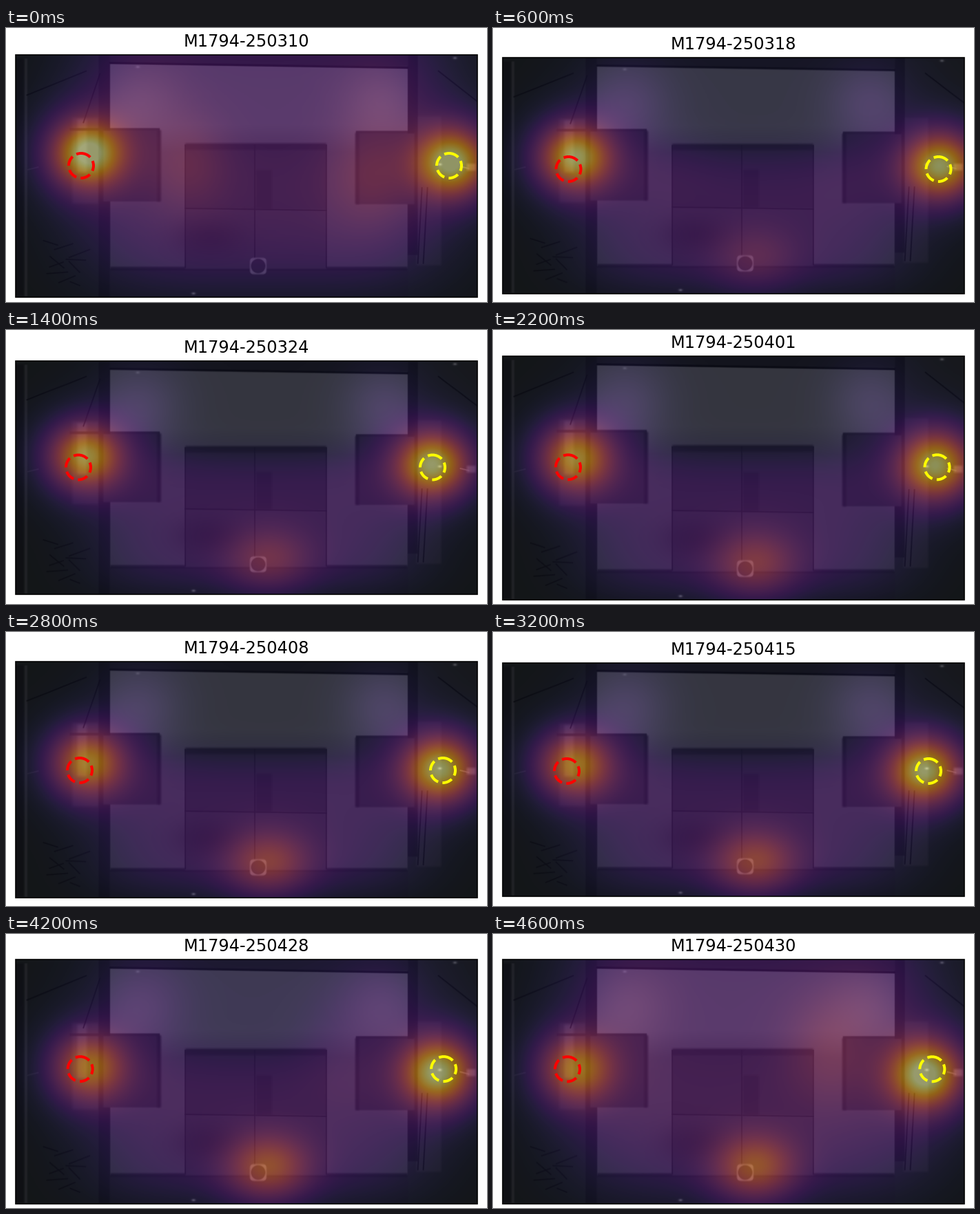
Write a matplotlib script that moves like this. It is 698x398 px and loops after 4.8 s.

```python
import numpy as np
import matplotlib.pyplot as plt
from matplotlib.animation import FuncAnimation
from matplotlib.patches import Circle, Rectangle

W, H, DPI = 698, 398, 128
PX = 72 / DPI                      # one pixel in points
LEFT, RIGHT, MID = 14, 684, 214.9
BASE = 176                         # half height the scene is laid out for
X, Y = np.meshgrid(np.linspace(LEFT, RIGHT, 670),
                   np.linspace(MID - BASE, MID + BASE, 352))

MARCH = "10 12 14 18 19 20 21 24 25 27 28"
APRIL = "01 03 04 08 10 15 17 23 24 25 28 29 30"
DATES = ["03" + d for d in MARCH.split()] + ["04" + d for d in APRIL.split()]

# day, half height of the picture, ring height, red x, yellow x
KEYS = np.array([
    (0, 176, 200, 109, 643),
    (3, 171.5, 205, 109.5, 646.5),
    (6, 177, 196, 108, 640),
    (7, 169.5, 199.5, 105, 619),
    (11, 177, 199.3, 109, 644.5),
    (14, 171.5, 201, 107, 634),
    (16, 169.5, 202, 107, 632),
    (18, 173.5, 199, 107, 630.5),
    (20, 177.5, 196, 107.5, 634),
    (23, 177.5, 196.3, 108, 637.3)]).T


def ramp(v, soft):
    return np.clip(v / soft + .5, 0, 1)


def box(x0, y0, x1, y1, soft=2):
    return (ramp(X - x0, soft) * ramp(x1 - X, soft)
            * ramp(Y - y0, soft) * ramp(y1 - Y, soft))


def blob(cx, cy, sx, sy):
    return np.exp(-((X - cx) / sx) ** 2 / 2 - ((Y - cy) / sy) ** 2 / 2)


def stroke(x0, y0, x1, y1, width=2):
    dx, dy = x1 - x0, y1 - y0
    t = np.clip(((X - x0) * dx + (Y - y0) * dy) / (dx * dx + dy * dy), 0, 1)
    return ramp(width / 2 - np.hypot(X - x0 - t * dx, Y - y0 - t * dy), 1.2)


def make_room():
    rng = np.random.default_rng(4)
    img = np.empty(X.shape + (3,))
    img[:] = (39, 44, 45)

    def paint(mask, grey, alpha=.8):
        color = np.array((grey - 2, grey, grey + 4))
        m = (mask * alpha)[..., None]
        img[:] = img * (1 - m) + color * m

    # surroundings and posts
    paint(box(585, 30, 700, 150, 30), 52, .6)
    paint(box(96, 130, 134, 255, 5), 58)
    paint(box(103, 132, 117, 210, 5), 86)
    paint(box(596, 128, 632, 345, 4), 60)
    paint(box(134, 30, 151, 400), 28)
    paint(box(583, 30, 598, 330), 26)

    # back wall
    wall = box(151, 40, 583, 350) * ramp(Y - 52 - (X - 151) / 62, 2)
    paint(box(150, 30, 584, 54), 38)
    paint(wall, 78, 1)
    paint(wall * ramp(160 - Y, 40), 104, 1)
    for x in (190, 548):
        paint(wall * blob(x, 110, 42, 37), 130)
    paint(stroke(151, 50, 583, 57, 3), 18)
    paint(box(151, 347, 583, 353, 3), 30)
    paint(box(150, 353, 584, 392, 3), 40)

    # side boxes
    for x0, x1, y, edge in [(141, 223, 148, 222), (508, 593, 152, 510)]:
        paint(box(x0, y, x1, y + 104, 3), 48, 1)
        paint(box(edge - 3, y, edge + 3, y + 104, 4), 32)
        paint(box(x0, y - 3, x1, y + 1), 28)
    paint(box(92, 145, 141, 149), 30)

    # centre crate
    paint(box(260, 169, 465, 350, 3), 56, 1)
    paint(box(260, 169, 465, 263), 46)
    paint(box(260, 167, 465, 177, 4), 34)
    paint(box(363, 206, 386, 263, 5), 36)
    paint(blob(297, 303, 34, 20), 38)
    paint(stroke(260, 262, 465, 265), 28)
    for x in (260, 361, 465):
        paint(stroke(x, 170, x, 348), 30)

    # round port
    r = np.hypot(X - 366, Y - 346)
    paint(box(354, 334, 378, 358, 3) * ramp(15 - r, 2), 112, 1)
    paint(ramp(10.5 - r, 2), 44, 1)

    # pole, cables, lamps
    paint(box(26.5, 44, 30.5, 390), 72)
    paint(box(14, 44, 25, 390, 4), 30)
    for seg in [(112, 137, 136, 66), (30, 97, 116, 62), (628, 62, 684, 106),
                (604, 232, 598, 342), (612, 232, 606, 342)]:
        paint(stroke(*seg), 20)
    for _ in range(10):
        x, y = rng.uniform(32, 95), rng.uniform(290, 375)
        paint(stroke(x, y, x + rng.uniform(10, 30),
                     y + rng.uniform(-14, 18)), 24)
    paint(stroke(30, 206, 46, 202), 64)
    paint(box(669, 197, 682, 207, 4), 110)
    paint(stroke(660, 201, 672, 204), 130, .6)
    for x, y in [(652, 43), (272, 386), (191, 56), (630, 198)]:
        paint(blob(x, y, 2, 1.3), 170)
    return img / 255


ROOM = make_room()
WIDE = np.exp(-((X - 375) / 280) ** 4 - ((Y - 165) / 215) ** 4)
FLOOR = np.exp(-((X - 365) / 240) ** 4 - ((Y - 285) / 108) ** 4)
CORNERS = blob(195, 98, 48, 55) + blob(548, 98, 45, 50)
inferno = plt.get_cmap("inferno")


def spot(x, y):
    return .82 * blob(x, y, 36, 34) + .18 * blob(x, y, 62, 56)


def heat_map(i, half, ring_y, red_x, yellow_x):
    t = i / (len(DATES) - 1)
    first, last = np.exp(-t / .07), np.exp((t - 1) / .09)
    ends = first + last            # whole room warm on the outer days

    def level(y):
        return MID + (y - MID) * BASE / half

    heat = (.03 + .2 * ends) * WIDE + (.18 - .14 * ends) * FLOOR
    heat += .08 * CORNERS
    heat += .15 * first * blob(265, 195, 40, 48)
    heat += .17 * ends * blob(530 - 44 * t, 215 - 49 * t, 45, 55)
    heat += .5 * np.sqrt(t) * blob(380, 340, 43, 34)
    heat += (.93 - .25 * t) * spot(red_x + 9 + 4 * t,
                                   level(ring_y - 18 * (1 - t * t)))
    heat += .93 * spot(yellow_x + 5 - 13 * t,
                       level(ring_y - 5 + 13 * t ** 3))
    return np.clip(heat, 0, .99)


fig = plt.figure(figsize=(W / DPI, H / DPI), dpi=DPI, facecolor="white")
ax = fig.add_axes([0, 0, 1, 1])
picture = ax.imshow(ROOM, extent=(LEFT, RIGHT, MID + BASE, MID - BASE),
                    aspect="auto")
ax.set(xlim=(0, W), ylim=(H, 0))
ax.autoscale(False)
ax.axis("off")


def ring(color):
    return ax.add_patch(Circle((0, 0), 18, fill=False, ec=color,
                               lw=4 * PX, ls="--"))


red, yellow = ring("red"), ring("yellow")
border = ax.add_patch(Rectangle((LEFT, 0), RIGHT - LEFT, 1, fill=False,
                                ec="black", lw=1.6 * PX))
title = ax.text((LEFT + RIGHT) / 2, 0, "", ha="center", va="baseline",
                family="DejaVu Sans", size=24 * PX, color="black")


def draw(i):
    half, ring_y, red_x, yellow_x = (np.interp(i, KEYS[0], k)
                                     for k in KEYS[1:])
    top, bottom = MID - half, MID + half
    heat = heat_map(i, half, ring_y, red_x, yellow_x)
    picture.set_data((ROOM + inferno(heat)[..., :3]) / 2)
    picture.set_extent((LEFT, RIGHT, bottom, top))
    border.set_y(top)
    border.set_height(2 * half)
    red.center = red_x, ring_y
    yellow.center = yellow_x, ring_y
    title.set_text("M1794-25" + DATES[i])
    title.set_y(top - 12)
    return picture, border, red, yellow, title


anim = FuncAnimation(fig, draw, frames=len(DATES), interval=200,
                     repeat=True, repeat_delay=0)
plt.show()
```
